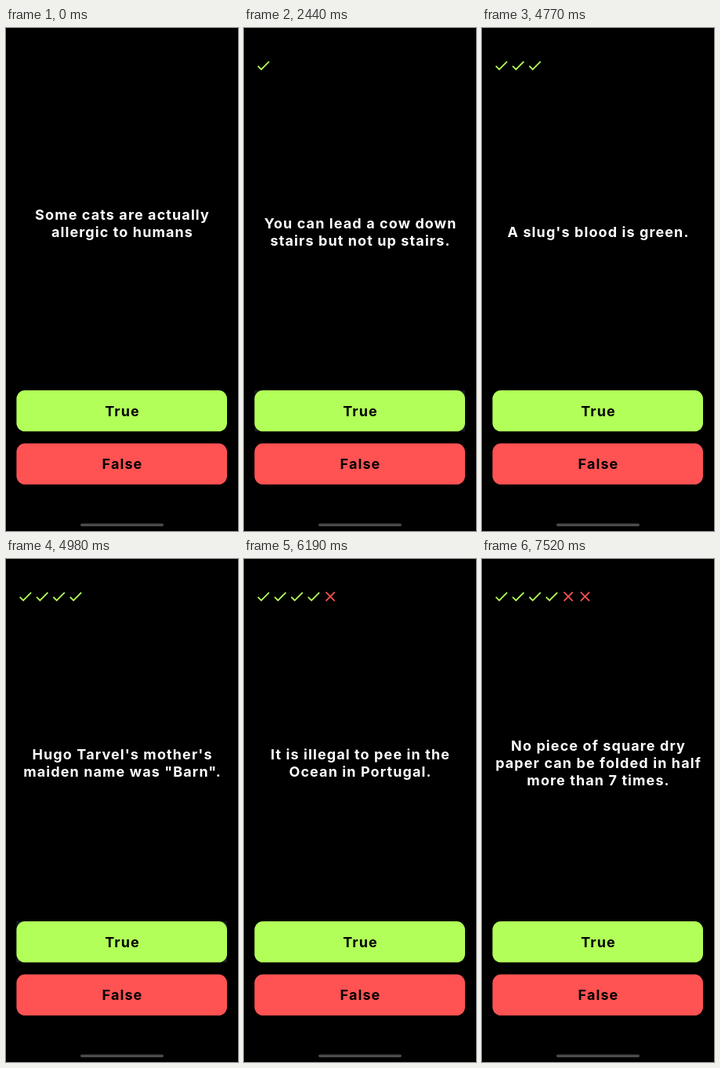
An HTML page that plays this animation: 296x640 px, repeating every 8 s.

```html
<!DOCTYPE html>
<html lang="en">
<head>
<meta charset="utf-8">
<title>True or false quiz</title>
<style>
  :root {
    --loop: 8s step-end infinite;
    --green: #b2ff59;
    --red: #ff5252;
    --icon: 21.36px;
    --track: 1.1px;
  }
  html, body {
    margin: 0;
    width: 100%;
    height: 100%;
    overflow: hidden;
    background: #000;
  }
  .stage {
    position: relative;
    width: 296px;
    height: 640px;
    overflow: hidden;
    font: 700 18px/22px Inter, sans-serif;
    letter-spacing: var(--track);
    text-align: center;
  }

  /* Questions: a stack that jumps one slide at a time */
  .questions {
    position: absolute;
    inset: 0 0 auto;
    height: 519px;
    overflow: hidden;
    color: #fff;
  }
  .stack {
    height: 100%;
    animation: next var(--loop);
  }
  .stack p {
    box-sizing: border-box;
    display: flex;
    align-items: center;
    justify-content: center;
    height: 100%;
    margin: 0;
    padding-left: var(--track);
    white-space: pre;
  }
  @keyframes next {
    0% { transform: none; }
    14% { transform: translateY(-100%); }
    31.75% { transform: translateY(-200%); }
    47.375% { transform: translateY(-300%); }
    62.25% { transform: translateY(-400%); }
    76% { transform: translateY(-500%); }
    92.625%, 100% { transform: translateY(-600%); }
  }

  /* Score row: widened by one icon per answer */
  .score {
    position: absolute;
    left: 14px;
    top: 36.5px;
    height: var(--icon);
    overflow: hidden;
    animation: score var(--loop);
  }
  .score svg {
    display: block;
    width: calc(6 * var(--icon));
    height: var(--icon);
    fill: none;
    stroke-width: 2;
  }
  #right { stroke: var(--green); }
  #wrong { stroke: var(--red); }
  @keyframes score {
    0% { width: 0; }
    14% { width: var(--icon); }
    31.75% { width: calc(2 * var(--icon)); }
    47.375% { width: calc(3 * var(--icon)); }
    62.25% { width: calc(4 * var(--icon)); }
    76% { width: calc(5 * var(--icon)); }
    92.625%, 100% { width: calc(6 * var(--icon)); }
  }

  /* Buttons: the press highlight shows only behind the round corners */
  .controls {
    position: absolute;
    inset: 0;
    width: 296px;
    height: 640px;
    text-anchor: middle;
  }
  .controls rect {
    width: 268.6px;
    height: 52.3px;
  }
  .controls .press {
    fill: #171c24;
    opacity: 0;
    animation: var(--press) var(--loop);
  }
  .controls .face {
    rx: 10.7px;
    fill: var(--face);
  }
  .true { --face: var(--green); --press: press-true; }
  .false { --face: var(--red); --press: press-false; }
  .controls .home {
    width: 106px;
    height: 3.6px;
    rx: 1.8px;
    fill: #4b4b4b;
  }
  @keyframes press-true {
    0%, 15.5%, 33%, 48.75%, 63.75%, 100% { opacity: 0; }
    12.625%, 30.5%, 46%, 60.875% { opacity: 1; }
  }
  @keyframes press-false {
    0%, 77.375%, 94%, 100% { opacity: 0; }
    74.75%, 91.125% { opacity: 1; }
  }
</style>
</head>
<body>
<div class="stage">
  <div class="questions">
    <div class="stack">
      <p>Some cats are actually
allergic to humans
&nbsp;</p>
      <p>You can lead a cow down
stairs but not up stairs.</p>
      <p>Approximately one
quarter of human bones
are in the feet.</p>
      <p>A slug's blood is green.</p>
      <p>Hugo Tarvel's mother's
maiden name was "Barn".</p>
      <p>It is illegal to pee in the
Ocean in Portugal.</p>
      <p>No piece of square dry
paper can be folded in half
more than 7 times.</p>
    </div>
  </div>

  <div class="score">
    <svg viewBox="0 0 144 24">
      <defs>
        <path id="right" d="M4.1 12.7 9 17.6 20.3 6.3"/>
        <path id="wrong" d="M5.7 5.7 18.3 18.3M18.3 5.7 5.7 18.3"/>
      </defs>
      <use href="#right"/>
      <use href="#right" x="24"/>
      <use href="#right" x="48"/>
      <use href="#right" x="72"/>
      <use href="#wrong" x="96"/>
      <use href="#wrong" x="120"/>
    </svg>
  </div>

  <svg class="controls" viewBox="0 0 296 640">
    <g class="true">
      <rect class="press" x="13.4" y="461"/>
      <rect class="face" x="13.4" y="461"/>
      <text x="148.5" y="493.8">True</text>
    </g>
    <g class="false">
      <rect class="press" x="13.4" y="528.5"/>
      <rect class="face" x="13.4" y="528.5"/>
      <text x="148.5" y="561.3">False</text>
    </g>
    <rect class="home" x="95" y="630.4"/>
  </svg>
</div>
</body>
</html>
```
